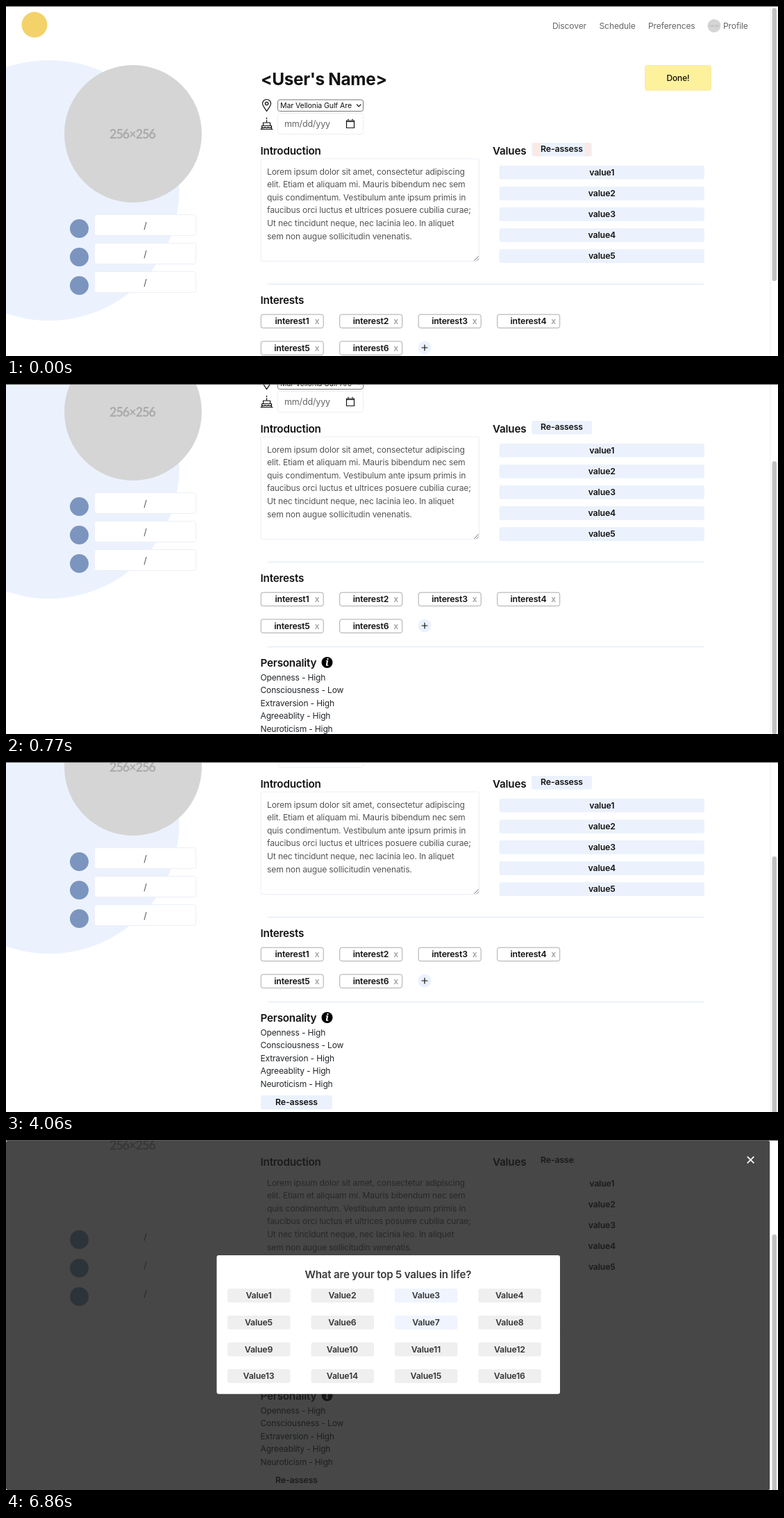
Animation of 1112 by 504 pixels, one loop 7000 ms. Source, as an HTML page:

```html
<!DOCTYPE html>
<html lang="en">
<head>
<meta charset="utf-8">
<title>Profile page</title>
<style>
  html, body { margin: 0; width: 1112px; height: 504px; overflow: hidden; background: #fff; }
  svg { display: block; }
  text { font-family: Inter, "Liberation Sans", sans-serif; letter-spacing: -.012em; white-space: pre; }
  .line { fill: none; stroke: #111; stroke-width: 1.2; stroke-linejoin: round; stroke-linecap: round; }
  .only-dim, .dim .soft { visibility: hidden; }
  .dim .only-dim { visibility: visible; }
</style>
</head>
<body>
<svg id="stage" width="1112" height="504" viewBox="0 0 1112 504"></svg>
<script>
const BLUE = '#ebf2fd', GREY = '#d5d5d5';
const LOOP = 7000, STEP = 70, MODAL_AT = 4130;
// [time, scroll offset]
const SCROLL = [[420, 0], [490, 1], [630, 3], [700, 68], [770, 144], [840, 168],
                [910, 172], [1120, 172], [1400, 175], [1890, 177]];
// modal choice number -> time its highlight starts
const PICKS = { 3: 4970, 7: 5670 };

const text = (x, y, str, { size = 12.1, weight = 400, fill = '#212529', anchor = 'start', extra = '' } = {}) =>
  `<text x="${x}" y="${y}" font-size="${size}" font-weight="${weight}" fill="${fill}" text-anchor="${anchor}" ${extra}>${str}</text>`;
const label = (x, y, str, opts) => text(x, y, str, { size: 12.3, weight: 600, fill: '#111', anchor: 'middle', ...opts });
const heading = (x, y, str) => text(x, y, str, { size: 15.2, weight: 600, fill: '#111' });
const rect = (x, y, w, h, fill, extra = '') =>
  `<rect x="${x}" y="${y}" width="${w}" height="${h}" rx="3" fill="${fill}" ${extra}/>`;
const soft = (x, y, w, h, fill = BLUE, extra = '') => rect(x, y, w, h, fill, 'class="soft" ' + extra);
const field = (x, y, w, h, stroke = '#ebeff6') => soft(x, y, w, h, '#fff', `stroke="${stroke}"`);
const circle = (x, y, r, fill, extra = '') => `<circle cx="${x}" cy="${y}" r="${r}" fill="${fill}" ${extra}/>`;
const path = (d, extra = '') => `<path d="${d}" class="line" ${extra}/>`;
const each = (list, fn) => list.map(fn).join('');

function header() {
  const nav = [[787, 'Discover'], [854.5, 'Schedule'], [925, 'Preferences'], [1033, 'Profile']];
  return circle(41, 27, 18.5, '#f3d26a') +
    each(nav, ([x, s]) => text(x, 33.2, s, { fill: '#666' })) +
    circle(1020, 28.5, 9.5, GREY) +
    text(1020, 30, '256×256', { size: 3.5, fill: '#aaa', anchor: 'middle' });
}

function sidebar() {
  return circle(62, 265.5, 187.5, BLUE, 'class="soft"') +
    circle(183, 184, 99, GREY, 'class="soft"') +
    text(182, 190.5, '256×256', { size: 18, weight: 700, fill: '#aaa', anchor: 'middle',
      extra: 'style="font-family:Lato,sans-serif;letter-spacing:-1px"' }) +
    each([0, 41, 82], dy => circle(105.5, 320.5 + dy, 13.5, '#7b95bf') +
      field(127.5, 300.5 + dy, 146, 30) +
      text(200.5, 321 + dy, '/', { size: 13, fill: '#555', anchor: 'middle' }));
}

function identity() {
  return text(367, 113.5, '&lt;User\'s Name&gt;', { size: 24.3, weight: 700, fill: '#111' }) +
    rect(920.5, 85.5, 95, 36, '#fdf19c', 'stroke="#f3eab0"') +
    label(968, 108.3, 'Done!', { weight: 500, size: 12 }) +
    path('M375.5 151.5C372 146 369.5 143.5 369.5 140.5a6 6 0 0 1 12 0C381.5 143.5 379 146 375.5 151.5Z') +
    '<circle cx="375.5" cy="140.5" r="2.2" class="line"/>' +
    rect(391.5, 135, 123, 16.5, '#fff', 'stroke="#777"') +
    text(395, 147, 'Mar Vellonia Gulf Are', { size: 10.6, fill: '#111' }) +
    path('M505.5 142l2.7 2.8 2.7-2.8', 'stroke-width="1.8"') +
    path('M367 177.5h17M368.5 177v-4.5h14V177M370.5 172.5V168h10v4.5M368.5 174.5q2.3 2 4.6 0q2.3 2 4.6 0q2.3 2 4.6 0M375.5 168v-3.5M375.5 161v1.5') +
    field(391.5, 154.5, 123, 30) +
    text(401, 174.2, 'mm/dd/yyy', { size: 12.5, fill: '#666' }) +
    path('M490.5 165h11v10.5h-11ZM490.5 166.5h11M493 163v2M499 163v2', 'stroke-width="1.5"');
}

function introduction() {
  const lines = ['Lorem ipsum dolor sit amet, consectetur adipiscing', 'elit. Etiam et aliquam mi. Mauris bibendum nec sem',
    'quis condimentum. Vestibulum ante ipsum primis in', 'faucibus orci luctus et ultrices posuere cubilia curae;',
    'Ut nec tincidunt neque, nec lacinia leo. In aliquet', 'sem non augue sollicitudin venenatis.'];
  return heading(366.5, 213.5, 'Introduction') + field(367, 220, 314.5, 147.5) +
    each(lines, (s, i) => text(376, 242.8 + i * 18.55, s, { fill: '#555' })) +
    path('M674.5 366.5l6-6M678 366.5l2.5-2.5', 'style="stroke:#777;stroke-width:1"');
}

function values() {
  return heading(701, 213.5, 'Values') + soft(757, 197, 87, 19.5) +
    rect(759, 197, 83, 19, '#fde8e2', 'id="warm"') + rect(769, 197, 65, 19, BLUE, 'id="cool"') +
    label(800.5, 210.4, 'Re-assess') + rect(819, 198, 20, 18, '#fff', 'class="only-dim"') +
    each([0, 1, 2, 3, 4], i => soft(710.5, 229.8 + i * 30.1, 295.5, 19.8) +
      label(858.3, 243.8 + i * 30.1, 'value' + (i + 1)));
}

function interests() {
  return heading(366.5, 428.5, 'Interests') +
    each([0, 1, 2, 3, 4, 5], i => {
      const x = 367 + i % 4 * 113.5, y = 444 + (i > 3 ? 38.7 : 0);
      return rect(x + .2, y + .2, 90, 19.5, '#fff', 'stroke="#aaa"') +
        label(x + 45, y + 14.3, 'interest' + (i + 1)) +
        label(x + 81, y + 14.3, 'x', { weight: 500, fill: '#999' });
    }) +
    circle(603, 492, 9.5, BLUE) + path('M599 492h8M603 488v8', 'stroke-width="1.6"');
}

function personality() {
  const traits = ['Openness - High', 'Consciousness - Low', 'Extraversion - High', 'Agreeablity - High', 'Neuroticism - High'];
  return heading(366.5, 550.5, 'Personality') + circle(462.5, 545, 8, '#000') +
    text(462.3, 549.5, 'i', { size: 14, weight: 700, fill: '#fff', anchor: 'middle',
      extra: 'font-style="italic" style="font-family:\'Noto Serif\',serif"' }) +
    each(traits, (s, i) => text(366.5, 570.7 + i * 18.55, s, { size: 12 })) +
    soft(367, 657, 103, 20) + label(418.5, 671.2, 'Re-assess');
}

function modal() {
  let out = rect(0, 1, 1100.5, 503, 'rgb(28,29,28)', 'rx="0" opacity=".811"'.replace('rx="0" ', '')) +
    path('M1068.3 24.3l8.6 8.6M1076.9 24.3l-8.6 8.6', 'style="stroke:#fff;stroke-width:1.7"') +
    rect(303.5, 166, 494.5, 199.7, '#fff') +
    label(550.3, 198.7, 'What are your top 5 values in life?', { size: 15.1, fill: '#3a3a3a' });
  for (let i = 0; i < 16; i++) {
    const x = 319 + i % 4 * 120.45, y = 214 + (i >> 2) * 38.7;
    out += rect(x, y, 90.5, 20, '#efefef', `id="choice${i + 1}"`) +
      label(x + 45, y + 14.2, 'Value' + (i + 1), { fill: '#333' });
  }
  return out;
}

const stage = document.getElementById('stage');
stage.innerHTML =
  `<g id="page">${header()}${sidebar()}${identity()}${introduction()}${values()}` +
  each([400.5, 522.5], y => soft(376, y - .8, 630, 1.6, '#e6edf8')) +
  `${interests()}${personality()}</g><g id="modal">${modal()}</g>` +
  '<rect x="1100.5" width="12" height="504" fill="#fff"/><rect x="1100.5" width="1" height="504" fill="#f0f0f0"/>' +
  rect(1103.5, 3, 6.5, 393, '#c1c1c1', 'id="thumb"') +
  '<rect width="1112" height="1" fill="#5c5c5c"/>';

const el = id => document.getElementById(id);
const clamp = v => Math.max(0, Math.min(1, v));
const show = (id, on) => el(id).setAttribute('visibility', on ? 'visible' : 'hidden');

function scrollAt(t) {
  let [t0, y0] = SCROLL[0];
  for (const [t1, y1] of SCROLL) {
    if (t < t1) return y0 + (y1 - y0) * clamp((t - t0) / (t1 - t0));
    [t0, y0] = [t1, y1];
  }
  return y0;
}

function draw(now) {
  const t = Math.floor(now % LOOP / STEP) * STEP;
  const y = scrollAt(t), open = t >= MODAL_AT;
  el('page').setAttribute('transform', `translate(0 ${-y})`);
  el('page').classList.toggle('dim', open);
  el('thumb').setAttribute('y', 3 + y * .752);
  show('modal', open);
  show('warm', t < 700);
  show('cool', t < 140);
  for (const n in PICKS) {
    const k = clamp((t - PICKS[n]) / 210);
    el('choice' + n).setAttribute('fill', `rgb(239,${239 + 5 * k},${239 + 16 * k})`);
  }
}

const start = performance.now();
(function tick() {
  draw(performance.now() - start);
  requestAnimationFrame(tick);
})();
</script>
</body>
</html>
```
